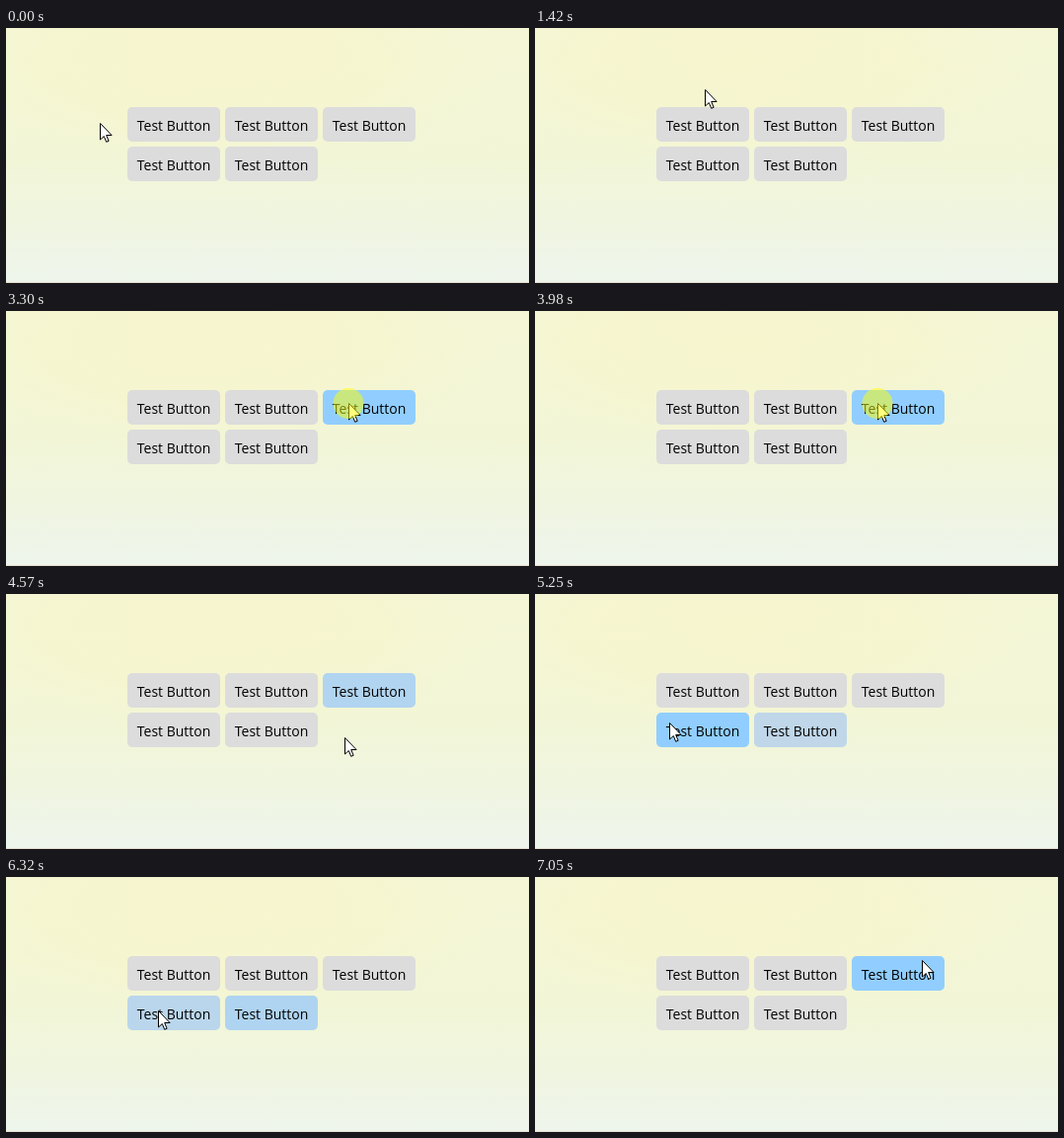
Recreate the animation shown at these times as an HTML page with a canvas. Size 530 by 258 pixels, loop 7150 ms.

```html
<!DOCTYPE html>
<html lang="en">
<head>
<meta charset="utf-8">
<title>Button hover</title>
<style>
  html, body { margin: 0; width: 100%; height: 100%; overflow: hidden; background: #f2f5d9; }
  canvas { display: block; width: 530px; height: 258px; }
</style>
</head>
<body>
<canvas id="stage" width="530" height="258"></canvas>
<script>
const W = 530, H = 258, LOOP = 7150, STEP = 5;
const ctx = document.getElementById('stage').getContext('2d');

const BTN = { w: 94, h: 35, gap: 5, radius: 5 };
const buttons = Array.from({ length: 5 }, (_, i) => ({
  x: 123 + (i % 3) * (BTN.w + BTN.gap),
  y: 80 + Math.floor(i / 3) * (BTN.h + BTN.gap)
}));
const clicked = buttons[2];

const IDLE = [220, 220, 220], HOVER = [145, 206, 255], PRESSED = [122, 193, 250];
const FADE_IN = 100, FADE_OUT = 200, RELEASE = 110, PRESS_DELAY = 30;
const clicks = [{ down: 3300, up: 3600 }, { down: 3980, up: 4320 }];

// Turning points of the pointer: time, x, y
const path = [
  [340, 95, 96], [630, 166, 96],
  [1060, 166, 96], [1300, 166, 60], [1420, 172, 62], [1750, 241, 84],
  [2260, 241, 84], [2400, 257, 66], [2530, 293, 57], [2830, 347, 93],
  [4420, 347, 93], [4570, 343, 145], [5030, 290, 134], [5250, 136, 130],
  [5440, 165, 97], [5780, 420, 97], [5920, 462, 99], [6225, 285, 145],
  [6320, 155, 135], [6350, 130, 132], [7050, 392, 84]
];

const clamp = (v, lo, hi) => Math.max(lo, Math.min(hi, v));
const mix = (a, b, k) => a.map((v, i) => v + (b[i] - v) * k);
const rgb = c => `rgb(${c.map(Math.round).join(',')})`;

// Monotone cubic tangents: no overshoot, flat during holds
function tangent(i, axis) {
  if (i === 0 || i === path.length - 1) return 0;
  const [p, q, r] = path.slice(i - 1, i + 2);
  const a = (q[axis] - p[axis]) / (q[0] - p[0]);
  const b = (r[axis] - q[axis]) / (r[0] - q[0]);
  return a * b <= 0 ? 0 : 2 * a * b / (a + b);
}

function pointer(time) {
  const t = clamp(time, path[0][0], path.at(-1)[0]);
  let i = 0;
  while (i < path.length - 2 && t >= path[i + 1][0]) i++;
  const p = path[i], q = path[i + 1], d = q[0] - p[0];
  const u = (t - p[0]) / d, v = 1 - u;
  const [x, y] = [1, 2].map(axis =>
    (1 + 2 * u) * v * v * p[axis] + u * v * v * d * tangent(i, axis) +
    u * u * (3 - 2 * u) * q[axis] - u * u * v * d * tangent(i + 1, axis));
  return { x, y };
}

// Hover amount of a button, sampled through the loop
function hoverLevels(b) {
  const levels = [];
  let level = 0;
  for (let t = 0; t <= LOOP; t += STEP) {
    const { x, y } = pointer(t);
    const inside = x >= b.x && x < b.x + BTN.w && y >= b.y && y < b.y + BTN.h;
    level = clamp(level + (inside ? STEP / FADE_IN : -STEP / FADE_OUT), 0, 1);
    levels.push(level);
  }
  return levels;
}
buttons.forEach(b => { b.hover = hoverLevels(b); });

const pressLevel = t => Math.max(...clicks.map(({ down, up }) =>
  t < down + PRESS_DELAY ? 0 : clamp(1 - (t - up) / RELEASE, 0, 1)));

function drawBackground() {
  const sky = ctx.createLinearGradient(0, 0, 0, H);
  sky.addColorStop(0, '#f4f6d6');
  sky.addColorStop(0.5, '#f2f6d7');
  sky.addColorStop(0.75, '#f0f5e0');
  sky.addColorStop(1, '#eef5ec');
  ctx.fillStyle = sky;
  ctx.fillRect(0, 0, W, H);

  ctx.save();
  ctx.translate(210, 35);
  ctx.scale(290, 105);
  const glow = ctx.createRadialGradient(0, 0, 0, 0, 0, 1);
  glow.addColorStop(0, 'rgba(246,245,206,1)');
  glow.addColorStop(0.6, 'rgba(246,245,206,.7)');
  glow.addColorStop(1, 'rgba(246,245,206,0)');
  ctx.fillStyle = glow;
  ctx.fillRect(-1, -1, 2, 2);
  ctx.restore();

  ctx.fillStyle = '#e9e2d3';
  ctx.fillRect(0, H - 1, W, 1);
}

function drawButton(b, color) {
  ctx.fillStyle = rgb(color);
  ctx.beginPath();
  ctx.roundRect(b.x, b.y, BTN.w, BTN.h, BTN.radius);
  ctx.fill();
  ctx.fillStyle = '#000';
  ctx.fillText('Test Button', b.x + BTN.w / 2, b.y + 24);
}

const arrow = new Path2D('M.5 .5V17L4.3 13.5L6.7 19.3L9.1 18.3L6.7 12.5H12.1Z');

function drawPointer(x, y) {
  ctx.save();
  ctx.translate(x, y);
  ctx.fillStyle = '#fff';
  ctx.strokeStyle = '#000';
  ctx.lineWidth = 1;
  ctx.fill(arrow);
  ctx.stroke(arrow);
  ctx.restore();
}

function drawClick(x, y) {
  ctx.fillStyle = 'rgba(255,255,0,.5)';
  ctx.beginPath();
  ctx.arc(x, y + 0.5, 15.5, 0, Math.PI * 2);
  ctx.fill();
}

function draw(t) {
  const { x, y } = pointer(t);
  const px = Math.round(x), py = Math.round(y);
  drawBackground();
  ctx.font = '14px "Open Sans", "Noto Sans", sans-serif';
  ctx.textAlign = 'center';
  for (const b of buttons) {
    const color = mix(IDLE, HOVER, b.hover[Math.floor(t / STEP)]);
    drawButton(b, b === clicked ? mix(color, PRESSED, pressLevel(t)) : color);
  }
  drawPointer(px, py);
  if (clicks.some(c => t >= c.down && t < c.up)) drawClick(px, py);
}

const start = performance.now();
function tick() {
  draw((performance.now() - start) % LOOP);
  requestAnimationFrame(tick);
}
tick();
</script>
</body>
</html>
```
